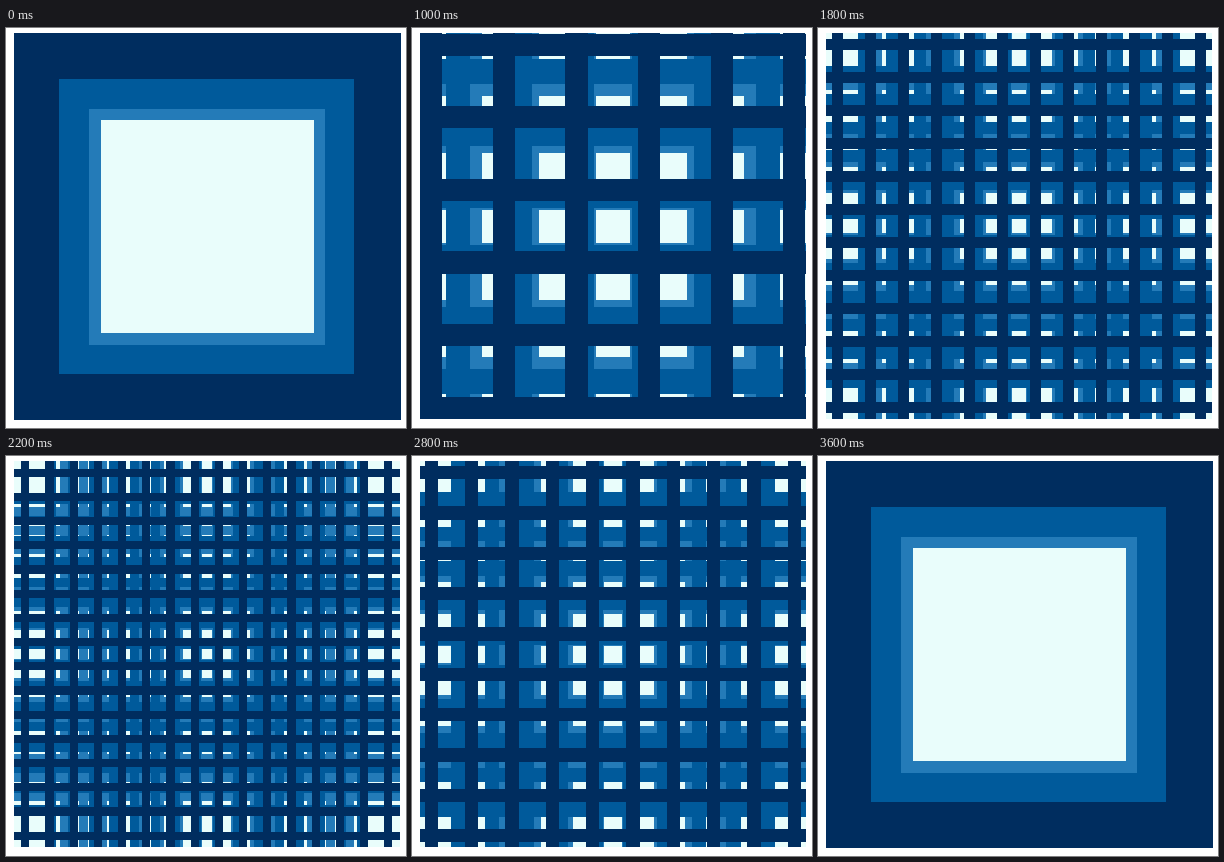
These frames come from a looping animation (400 px wide and 400 px high, 3.8 s). An HTML page with a canvas:

```html
<!DOCTYPE html>
<html lang="en">
<head>
<meta charset="utf-8">
<title>Woven grids</title>
<style>
  html, body { margin: 0; width: 100%; height: 100%; overflow: hidden; background: #fff; }
  canvas { display: block; }
</style>
</head>
<body>
<canvas id="stage" width="400" height="400"></canvas>
<script>
const ctx = document.getElementById('stage').getContext('2d');
const LOOP = 3800;
const LEFT = 8, TOP = 5;

// Back to front: centre, distance between the outer bars, bar weight
const layers = [
  { color: '#247bb8', cx: 201.1, cy: 198.3, span: 285, weight: 140 },
  { color: '#005a9b', cx: 200.8, cy: 198.6, span: 310, weight: 144 },
  { color: '#002d5f', cx: 200.8, cy: 198.2, span: 363, weight: 132 }
];

function drawGrid({ color, cx, cy, span, weight }, cells, size) {
  const bar = weight / (cells + 0.945);
  ctx.fillStyle = color;
  for (let i = 0; i <= cells; i++) {
    const offset = span * (i / cells - 0.5);
    const edges = c => [Math.round(c + offset - bar / 2), Math.round(c + offset + bar / 2)];
    const [x0, x1] = edges(cx);
    const [y0, y1] = edges(cy);
    ctx.fillRect(x0, TOP, x1 - x0, size);
    ctx.fillRect(LEFT, y0, size, y1 - y0);
  }
}

// The grid gets finer up to the middle of the loop, then coarser again
function cellsAt(t) {
  const step = t < 400 ? 0 : t < 1000 ? 1 : t < 1400 ? 2 : 3 + Math.floor((t - 1400) / 200);
  return 15 - 2 * Math.abs(step - 7);
}

function draw(t) {
  const cells = cellsAt(t);
  const size = cells < 5 ? 387 : 386;
  ctx.fillStyle = '#fff';
  ctx.fillRect(0, 0, 400, 400);
  ctx.save();
  ctx.beginPath();
  ctx.rect(LEFT, TOP, size, size);
  ctx.clip();
  ctx.fillStyle = '#e9fdfb';
  ctx.fillRect(LEFT, TOP, size, size);
  for (const layer of layers) drawGrid(layer, cells, size);
  ctx.restore();
}

const start = performance.now();
function tick() {
  draw((performance.now() - start) % LOOP);
  requestAnimationFrame(tick);
}
tick();
</script>
</body>
</html>
```
